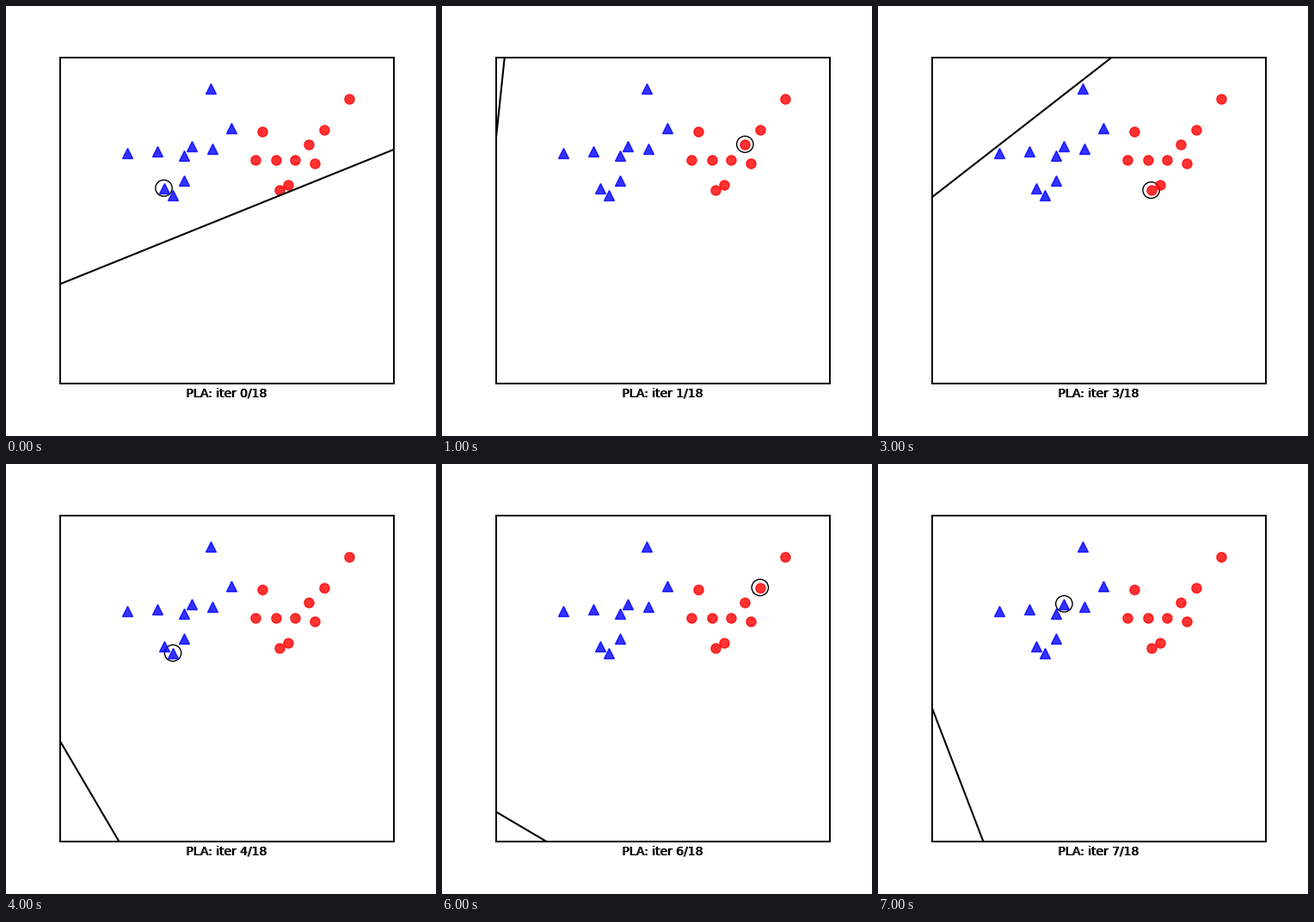
Write a matplotlib script that moves like this. It is 500 by 500 pixels and loops after 8 s.

```python
import numpy as np
import matplotlib.pyplot as plt
from matplotlib.animation import FuncAnimation

SIZE, DPI = 500, 100
LEFT, RIGHT, TOP, BOTTOM = 63, 451, 60, 439
TOTAL_ITERS = 18
PICKS = [7, 10, 0, 18, 3, 6, 14, 9]  # misclassified point used at each step

np.random.seed(2)


def cluster(center, n=10):
    """Correlated Gaussian cloud stretched along the diagonal."""
    z = np.random.randn(n, 2)
    a, b = 0.5, np.sqrt(0.05)
    return np.array(center) + z @ np.array([[-a, -a], [-b, b]])


pos, neg = cluster((2, 2)), cluster((4, 2))
points = np.vstack([pos, neg])
features = np.column_stack([np.ones(len(points)), points])
labels = np.repeat([1, -1], 10)

# Perceptron updates: w <- w + y * x
weights = [np.random.randn(3)]
for i in PICKS[:-1]:
    weights.append(weights[-1] + labels[i] * features[i])

fig = plt.figure(figsize=(SIZE / DPI, SIZE / DPI), dpi=DPI, facecolor="white")
ax = fig.add_axes([LEFT / SIZE, 1 - BOTTOM / SIZE,
                   (RIGHT - LEFT) / SIZE, (BOTTOM - TOP) / SIZE])
ax.set(xlim=(0, 6), ylim=(-2, 4), xticks=[], yticks=[])
for spine in ax.spines.values():
    spine.set_linewidth(1.44)

ax.plot(*pos.T, "b^", markersize=8, alpha=0.8)
ax.plot(*neg.T, "ro", markersize=8, alpha=0.8)
boundary, = ax.plot([], [], "k", lw=1.5)
ring = ax.add_patch(plt.Circle((0, 0), 0.15, color="k", fill=False))

# Two overlaid copies give the caption its heavy look
captions = [fig.text(x / SIZE, 1 - 455 / SIZE, "", fontsize=10, color="k",
                     family="DejaVu Sans", ha="center", va="baseline")
            for x in (255.75, 256.75)]


def update(k):
    w0, w1, w2 = weights[k]
    x = np.array([-100, 100])
    boundary.set_data(x, -(w0 + w1 * x) / w2)
    ring.center = points[PICKS[k]]
    for text in captions:
        text.set_text(f"PLA: iter {k}/{TOTAL_ITERS}")
    return [boundary, ring, *captions]


anim = FuncAnimation(fig, update, frames=len(PICKS), interval=1000,
                     repeat=True, repeat_delay=0)
plt.show()
```
